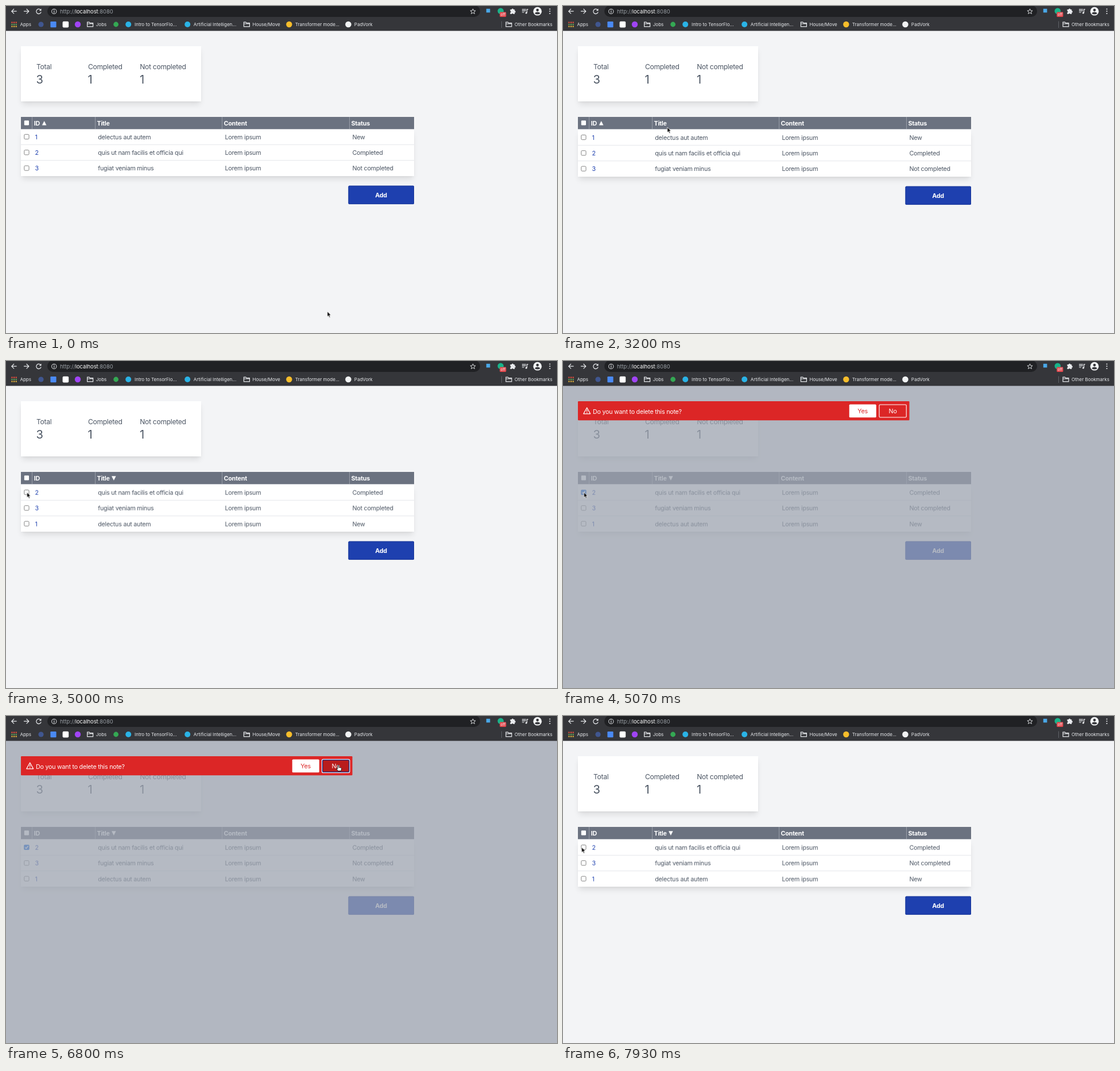
Recreate the animation shown at these times as an HTML page. Size 960x569 px, loop 8 s.

```html
<!DOCTYPE html>
<html lang="en">
<head>
<meta charset="utf-8">
<title>Notes table</title>
<style>
html, body { margin: 0; width: 100%; height: 100%; overflow: hidden; background: #f3f4f6; }
svg { position: absolute; left: 0; top: 0; display: block; }
text { font: 10.67px Inter, "Liberation Sans", sans-serif; letter-spacing: -.02em; fill: #4b5563; white-space: pre; }

.box {
  position: absolute; left: 26px; background: #fff;
  box-shadow: 0 6.7px 10px -2px rgba(0,0,0,.1), 0 2.7px 4px -1.3px rgba(0,0,0,.05);
}
.card { top: 70px; width: 314px; height: 96px; }
.table { top: 214px; width: 685px; height: 82px; }

.bar text { font-size: 8px; letter-spacing: 0; fill: #e8eaed; }
.bar .url { font-size: 9.33px; fill: #9aa0a6; }
.bar .host { fill: #fff; }
.line { fill: none; stroke: #e8eaed; stroke-width: 1.2; }
.label { font-size: 12px; }
.num { font-size: 20px; }
.head text, .bold { font-weight: 700; fill: #fff; }
.id { fill: #1e40af; }
.mid { text-anchor: middle; }
.white { fill: #fff; }

/* One 8 s clock for every part */
.shift, .row, .flag { animation: 8s step-end infinite; }
.shift { animation-name: shift; }
.r1 { animation-name: r1; }
.r2 { animation-name: r2; }
.r3 { animation-name: r3; }
.id-up { animation-name: id-up; }
.id-down { animation-name: id-down; }
.title-up { animation-name: title-up; }
.title-down { animation-name: title-down; }
.dialog { animation-name: dialog; }
.hover { animation-name: hover; }
.focus { animation-name: focus; }
.arrow { animation-name: arrow; }
.mouse { animation: mouse 8s ease-in-out infinite; }

@keyframes shift { 0% { transform: none } 22.5%, 100% { transform: translateY(1px) } }

/* Row places: 0, 27.3 and 54.6 px */
@keyframes r1 {
  0%, 32.5% { transform: translateY(0) }
  22.5%, 50%, 100% { transform: translateY(54.6px) }
}
@keyframes r2 {
  0% { transform: translateY(27.3px) }
  40.875% { transform: translateY(54.6px) }
  50%, 100% { transform: translateY(0) }
}
@keyframes r3 {
  0%, 32.5% { transform: translateY(54.6px) }
  22.5% { transform: translateY(0) }
  40.875%, 100% { transform: translateY(27.3px) }
}

@keyframes id-up { 0%, 32.5% { opacity: 1 } 22.5%, 40.875%, 100% { opacity: 0 } }
@keyframes id-down { 0%, 32.5%, 100% { opacity: 0 } 22.5% { opacity: 1 } }
@keyframes title-up { 0%, 50%, 100% { opacity: 0 } 40.875% { opacity: 1 } }
@keyframes title-down { 0% { opacity: 0 } 50%, 100% { opacity: 1 } }
@keyframes dialog { 0%, 88.375%, 100% { opacity: 0 } 63.375% { opacity: 1 } }
@keyframes hover { 0%, 88.375%, 100% { opacity: 0 } 82.5% { opacity: 1 } }
@keyframes focus { 0%, 88.375%, 100% { opacity: 0 } 85% { opacity: 1 } }
@keyframes arrow { 0%, 88.375%, 100% { opacity: 1 } 82.5% { opacity: 0 } }

@keyframes mouse {
  0%, 1% { transform: translate(559.8px, 531.5px) }
  1.5%, 7.6% { transform: translate(559px, 529px) }
  9.375%, 12.4% { transform: translate(420px, 333px) }
  20.8%, 33% { transform: translate(102.5px, 208.5px) }
  35%, 37.3% { transform: translate(145px, 208px) }
  40%, 53.2% { transform: translate(181.7px, 211px) }
  62.4%, 75.7% { transform: translate(36.5px, 228.5px) }
  83.5%, 88.375% { transform: translate(579px, 86px) }
  98.3%, 98.9% { transform: translate(28px, 225px) }
  99.1%, 100% { transform: translate(32.5px, 228.3px) }
}
</style>
</head>
<body>
<div class="box card"></div>
<div class="box table shift"></div>

<svg width="960" height="569" viewBox="0 0 960 569">
  <defs>
    <path id="folder" class="line" d="M.6 8.4V.8H4L5.2 2.2H10.6V8.4ZM.6 3.6H10.6"/>
    <rect id="check" x="31.8" y="223.4" width="8.2" height="8.2" rx="1.6" fill="#fff" stroke="#767676" stroke-width=".9"/>
    <path id="up" class="white" d="M0 7.6L3.8 0L7.6 7.6Z"/>
    <path id="down" class="white" d="M0 0H7.6L3.8 7.6Z"/>
  </defs>

  <!-- Summary -->
  <text class="label" x="53" y="110">Total</text>
  <text class="label" x="143" y="110">Completed</text>
  <text class="label" x="233.3" y="110">Not completed</text>
  <text class="num" x="52.6" y="135.2">3</text>
  <text class="num" x="142.6" y="135.2">1</text>
  <text class="num" x="233" y="135.2">1</text>

  <!-- Table -->
  <g class="shift">
    <path d="M26 241.3H711M26 268.6H711" stroke="#e5e7eb"/>
    <use href="#check"/>
    <use href="#check" y="27.3"/>
    <use href="#check" y="54.6"/>
    <g class="flag dialog">
      <rect x="31.3" y="222.9" width="9.2" height="9.2" rx="1.6" fill="#0b63e5"/>
      <path d="M33.4 227.6L35.2 229.5L38.6 225.2" fill="none" stroke="#fff" stroke-width="1.3"/>
    </g>
    <g class="row r1">
      <text class="id" x="50.6" y="231.8">1</text>
      <text x="160.3" y="231.8">delectus aut autem</text>
      <text x="381.5" y="231.8">Lorem ipsum</text>
      <text x="603.5" y="231.8">New</text>
    </g>
    <g class="row r2">
      <text class="id" x="50.6" y="231.8">2</text>
      <text x="160.3" y="231.8">quis ut nam facilis et officia qui</text>
      <text x="381.5" y="231.8">Lorem ipsum</text>
      <text x="603.5" y="231.8">Completed</text>
    </g>
    <g class="row r3">
      <text class="id" x="50.6" y="231.8">3</text>
      <text x="160.3" y="231.8">fugiat veniam minus</text>
      <text x="381.5" y="231.8">Lorem ipsum</text>
      <text x="603.5" y="231.8">Not completed</text>
    </g>
    <rect x="596.5" y="312.7" width="114.5" height="32" rx="1.5" fill="#1e40af"/>
    <rect x="597" y="313.2" width="113.5" height="31" rx="1.2" fill="none" stroke="#1a3899"/>
    <text class="bold mid" x="653.6" y="332.6">Add</text>
  </g>
  <g class="head">
    <rect x="26" y="193" width="685" height="21.3" fill="#6b7280"/>
    <path d="M45.5 193V214M155.5 193V214M376.5 193V214M598.5 193V214" stroke="#a3a8b2" stroke-width=".8"/>
    <rect class="white" x="31.8" y="199.3" width="8.2" height="8.2" rx="1.2"/>
    <text x="48.8" y="207.6">ID</text>
    <text x="158.5" y="207.6">Title</text>
    <text x="379.6" y="207.6">Content</text>
    <text x="601.6" y="207.6">Status</text>
    <use class="flag id-up" href="#up" x="62.8" y="200"/>
    <use class="flag id-down" href="#down" x="62.8" y="200.3"/>
    <use class="flag title-up" href="#up" x="184" y="200"/>
    <use class="flag title-down" href="#down" x="184" y="200.3"/>
  </g>

  <!-- Dialog -->
  <g class="flag dialog">
    <rect y="43" width="960" height="526" fill="#9ca3af" opacity=".75"/>
    <rect x="26" y="70" width="577.5" height="33.3" rx="1.3" fill="#dc2626"/>
    <path d="M41.7 81.2L47.6 91.8H35.8Z" fill="none" stroke="#fff" stroke-width="1.3" stroke-linejoin="round"/>
    <path d="M41.7 84.6V88.2M41.7 89.2V90.4" stroke="#fff" stroke-width="1.2"/>
    <text class="white" x="52" y="92">Do you want to delete this note?</text>
    <rect class="white" x="498.7" y="75.6" width="47" height="22.7" rx="1.6"/>
    <text class="mid" x="522" y="90.8" style="fill:#dc2626">Yes</text>
    <rect class="flag hover" x="551" y="76" width="47.2" height="22" rx="1.6" fill="#b91c1c"/>
    <rect x="551" y="76" width="47.2" height="22" rx="1.6" fill="none" stroke="#fff" stroke-width="1.1"/>
    <g class="flag focus" fill="none">
      <rect x="550.4" y="75.4" width="48.4" height="23.2" rx="2.2" stroke="#dbe6fb" stroke-width="1.3"/>
      <rect x="551.6" y="76.6" width="46" height="20.8" rx="1.4" stroke="#1c2f7c" stroke-width="1.3"/>
    </g>
    <text class="white mid" x="574.6" y="90.8">No</text>
  </g>

  <!-- Browser bar -->
  <g class="bar">
    <rect width="960" height="43.3" fill="#35363a"/>
    <rect x="72" y="-1" width="754" height="20" rx="10" fill="#202124"/>
    <path class="line" d="M18.6 9.2H9.8M14 5L9.8 9.2L14 13.4M31 9.2H39.8M35.6 5L39.8 9.2L35.6 13.4"/>
    <path class="line" d="M60.2 6.6A4.2 4.2 0 1 0 61.1 10.4"/>
    <path d="M61.5 4.4V8.3H57.6Z" fill="#e8eaed"/>
    <circle class="line" cx="83.8" cy="9.4" r="4.1" style="stroke-width:1"/>
    <path class="line" d="M83.8 8.8V11.8M83.8 6.8V7.9"/>
    <text class="url" x="94" y="12.8">http://<tspan class="host">localhost</tspan>:8080</text>
    <path class="line" style="stroke-width:.9" d="M813.5 4.9L814.8 8L818.1 8.2L815.5 10.3L816.4 13.5L813.5 11.7L810.6 13.5L811.5 10.3L808.9 8.2L812.2 8Z"/>
    <rect x="836.8" y="4.8" width="6.6" height="6.6" fill="#4aa8e8"/>
    <circle cx="861.8" cy="8.8" r="5.3" fill="#18b48a"/>
    <rect x="860.2" y="10.6" width="11.2" height="8.4" rx="1.4" fill="#e5484d"/>
    <text x="865.8" y="17.2" class="mid" style="font-size:6.8px">off</text>
    <path fill="#e8eaed" d="M878.5 6H881A1.6 1.6 0 0 1 884.2 6H886.3V8.3A1.6 1.6 0 0 1 886.3 11.5V14H883.9A1.5 1.5 0 0 0 881 14H878.5V11.4A1.5 1.5 0 0 0 878.5 8.5Z"/>
    <path class="line" d="M899 5.8H906M899 8.4H906M899 11H903M907.6 12V5.8H909.8"/>
    <circle cx="906.4" cy="12" r="1.6" fill="#e8eaed"/>
    <circle cx="926" cy="9.2" r="7.4" fill="#f1f3f4"/>
    <circle cx="926" cy="7.1" r="2.3" fill="#35363a"/>
    <path d="M921.4 13.2Q922 10.6 926 10.6T930.6 13.2Q926 15.8 921.4 13.2Z" fill="#35363a"/>
    <path d="M946.6 4.4h1.8v1.8h-1.8zM946.6 8.3h1.8v1.8h-1.8zM946.6 12.2h1.8v1.8h-1.8z" fill="#e8eaed"/>

    <g fill="none" stroke-width="2.2" stroke-dasharray="2.2 1.4">
      <path d="M9.4 28.6H18.8" stroke="#ea4f3d"/>
      <path d="M9.4 32.1H18.8" stroke="#5fa55a"/>
      <path d="M9.4 35.6H18.8" stroke="#e8b53a"/>
    </g>
    <text x="24.4" y="34.8">Apps</text>
    <circle cx="61" cy="32" r="4.6" fill="#40568f"/>
    <rect x="77.4" y="27" width="10.2" height="10.2" rx="1.2" fill="#4a8af4"/>
    <rect x="98.6" y="26.8" width="10.6" height="10.6" rx="2" fill="#fff"/>
    <circle cx="125" cy="32" r="5.2" fill="#a044f5"/>
    <use href="#folder" x="141" y="27.4"/>
    <text x="156.8" y="34.8">Jobs</text>
    <circle cx="191.6" cy="32" r="4.4" fill="#34a853"/>
    <circle cx="213.2" cy="32" r="5" fill="#2ab3e6"/>
    <text x="224" y="34.8">Intro to TensorFlo...</text>
    <circle cx="316.2" cy="32" r="5" fill="#2ab3e6"/>
    <text x="326.8" y="34.8">Artificial Intelligen...</text>
    <use href="#folder" x="413.8" y="27.4"/>
    <text x="429.6" y="34.8">House/Move</text>
    <circle cx="493.3" cy="32" r="5.2" fill="#f7bd2b"/>
    <text x="503.8" y="34.8">Transformer mode...</text>
    <circle cx="596.4" cy="32" r="5.3" fill="#f1f3f4"/>
    <text x="606.8" y="34.8">PadVork</text>
    <path d="M863.5 26.5V38" stroke="#5f6368"/>
    <use href="#folder" x="870.4" y="27.4"/>
    <text x="886" y="34.8">Other Bookmarks</text>
  </g>

  <!-- Pointer -->
  <g class="mouse">
    <path class="flag arrow" d="M0 0V9.2L2.1 7.3L3.6 10.7L5.2 10L3.7 6.7H6.5Z" fill="#000" stroke="#fff" stroke-width=".8"/>
    <path class="flag hover" d="M-1 0Q0-1.2 1 0V3.6Q5.4 3.4 5.6 5.2L4.8 9.6H-.6L-3 6Q-3.2 4.6-1.6 5.2L-1 5.8Z" fill="#fff" stroke="#111" stroke-width=".9"/>
  </g>
</svg>
</body>
</html>
```
